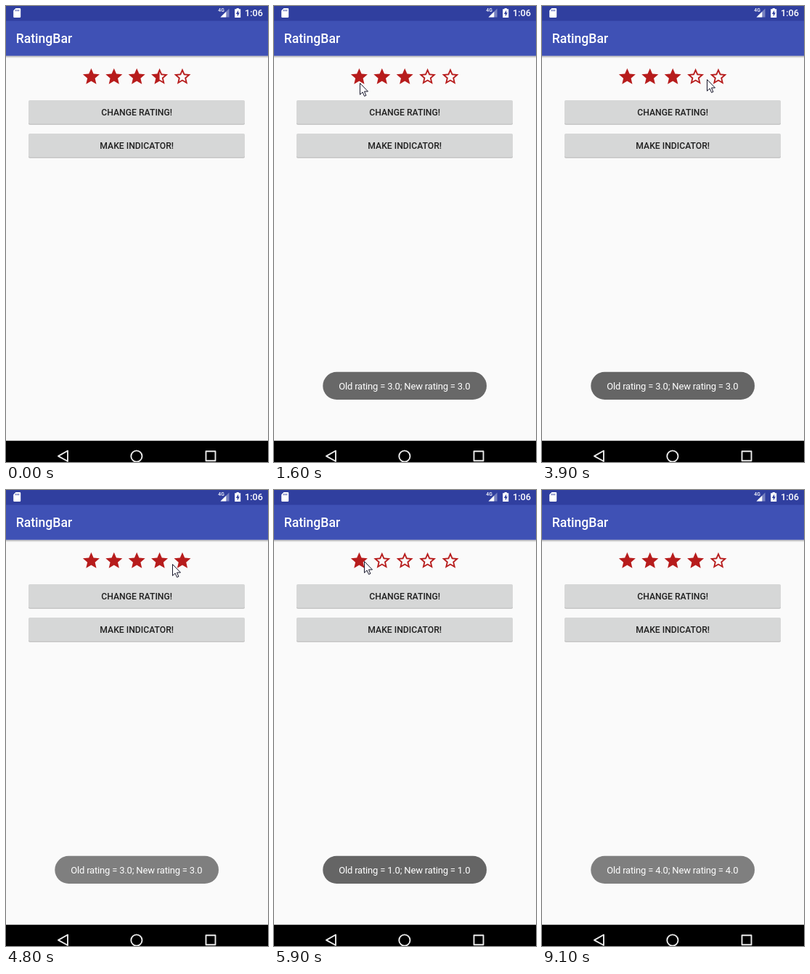
These frames come from a looping animation (361 px wide and 629 px high, 9.2 s). An HTML page:

```html
<!DOCTYPE html>
<html lang="en">
<head>
<meta charset="utf-8">
<title>Rating bar</title>
<style>
  html, body { margin: 0; width: 100%; height: 100%; overflow: hidden; background: #fafafa; }
  svg { display: block; width: 100%; height: 100%; }
  text { font-family: Roboto, sans-serif; }
  .medium { font-weight: 500; }
  .button rect { fill: #d6d7d7; filter: drop-shadow(0 1px .7px rgba(0, 0, 0, .27)); }
  .button text { fill: #202020; font-size: 12.2px; font-weight: 500; text-anchor: middle; }
  .nav { fill: none; stroke: #ececec; stroke-width: 1.9; stroke-linejoin: round; }
  #toast text { fill: #fff; font-size: 13px; letter-spacing: -.18px; }
</style>
</head>
<body>
<svg viewBox="0 0 361 629">
  <defs>
    <linearGradient id="shade" x2="0" y2="1">
      <stop stop-color="#000" stop-opacity=".32"/>
      <stop offset="1" stop-color="#000" stop-opacity="0"/>
    </linearGradient>
  </defs>
  <rect width="361" height="629" fill="#fafafa"/>

  <rect y="68.5" width="361" height="3.5" fill="url(#shade)"/>
  <rect y="20" width="361" height="48.7" fill="#3f51b5"/>
  <rect width="361" height="20.5" fill="#303f9f"/>
  <text class="medium" x="13.7" y="51" font-size="17.6" fill="#fff">RatingBar</text>

  <g fill="#fff">
    <path d="M13.5 3H19a1.2 1.2 0 0 1 1.2 1.2V14.8A1.2 1.2 0 0 1 19 16H11.4a1.2 1.2 0 0 1-1.2-1.2V6.3z"/>
    <path d="M13.6 5v2.3M15.6 5v2.3M17.6 5v2.3" stroke="#303f9f" stroke-width=".9"/>
    <text class="medium" x="292.3" y="8.3" font-size="6.8">4G</text>
    <path d="M307.5 3.5V15.5H295.5z" opacity=".35"/>
    <path d="M303.3 7.7V15.5H295.5z"/>
    <path d="M317.6 3h3.2v1.3h2.4V16h-8V4.3h2.4z"/>
    <path d="M320.1 5.8l-3.2 5.1h1.9v3.6l3.1-5.2h-1.8z" fill="#303f9f"/>
    <text class="medium" x="329" y="14.3" font-size="12.7">1:06</text>
  </g>

  <g id="stars" fill="#b71c1c" fill-rule="evenodd"></g>

  <g class="button">
    <rect x="31" y="130" width="298" height="32.8" rx="1.8"/>
    <text x="180.2" y="151">CHANGE RATING!</text>
  </g>
  <g class="button">
    <rect x="31" y="176" width="298" height="32.8" rx="1.8"/>
    <text x="180.2" y="197">MAKE INDICATOR!</text>
  </g>

  <g id="toast">
    <rect x="67.3" y="504.8" width="225.7" height="38.2" rx="19.1" fill="#656565"/>
    <text x="89.2" y="529"></text>
  </g>

  <rect y="599.7" width="361" height="30"/>
  <g class="nav">
    <path d="M72 620.8L85 613.5V628z"/>
    <circle cx="179.9" cy="621" r="7.6"/>
    <rect x="275.5" y="614.3" width="13" height="13"/>
  </g>

  <path id="cursor" d="M.5 .5V16.2L4.1 12.8L6.6 18.4L8.9 17.4L6.5 11.9H11.5z" fill="#fff" stroke="#15152a"/>
</svg>
<script>
  const LOOP = 9200, STEP = 100;
  const STAR_LEFT = 101.6, STAR_WIDTH = 31.4, FIRST_RATING = 3.5;
  const FADE_IN = 550, FADE_OUT = 380;
  const $ = (query) => document.querySelector(query);

  // Material star: body, full hole and right-hand half of the hole
  const BODY = 'M12 17.27L18.18 21l-1.64-7.03L22 9.24l-7.19-.61L12 2 9.19 8.63 2 9.24l5.46 4.73L5.82 21z';
  const HOLE = 'M12 15.4l-3.76 2.27 1-4.28-3.32-2.88 4.38-.38L12 6.1l1.71 4.04 4.38.38-3.32 2.88 1 4.28z';
  const HALF = 'M12 15.4V6.1l1.71 4.04 4.38.38-3.32 2.88 1 4.28z';

  // Places the pointer visits, entering and leaving off stage
  const stops = [
    { arrive: 0, leave: 0, x: 370, y: 58 },
    { arrive: 900, leave: 1000, x: 228, y: 106 },
    { arrive: 1300, leave: 1300, x: 161, y: 111 },
    { arrive: 1700, leave: 1800, x: 104, y: 104 },
    { arrive: 2500, leave: 2700, x: 185, y: 98 },
    { arrive: 3000, leave: 3200, x: 209, y: 117 },
    { arrive: 3700, leave: 3800, x: 223, y: 101 },
    { arrive: 4300, leave: 4500, x: 243, y: 101 },
    { arrive: 4800, leave: 4800, x: 229, y: 102 },
    { arrive: 5200, leave: 5800, x: 113, y: 104 },
    { arrive: 5900, leave: 5900, x: 124, y: 98 },
    { arrive: 6600, leave: 7800, x: 211, y: 105 },
    { arrive: 7900, leave: 7900, x: 214, y: 101 },
    { arrive: 8600, leave: LOOP, x: 362, y: 74 }
  ];
  // The button goes down and up; a drag lasts longer than a tap
  const presses = [
    { down: 1200, up: 1200 },
    { down: 1700, up: 1700 },
    { down: 2400, up: 2400 },
    { down: 4700, up: 5200 },
    { down: 6500, up: 6500 }
  ];
  const toasts = [{ show: 1100, hide: 4640 }, { show: 4950, hide: 8940 }];

  const clamp = (v) => Math.min(1, Math.max(0, v));
  const smooth = (k) => k * k * (3 - 2 * k);

  function pointerAt(t) {
    const i = stops.findLastIndex((stop) => stop.arrive <= t);
    const from = stops[i], to = stops[i + 1] || from;
    const k = clamp((t - from.leave) / (to.arrive - from.leave || 1));
    return { x: from.x + (to.x - from.x) * k, y: from.y + (to.y - from.y) * k };
  }

  // Star under the pointer during the latest press; `edge` is when a press starts to count
  function ratingAt(t, edge) {
    const press = presses.findLast((p) => p[edge] <= t);
    if (!press) return FIRST_RATING;
    const { x } = pointerAt(Math.min(t, press.up));
    return Math.ceil((x - STAR_LEFT) / STAR_WIDTH);
  }

  function toastOpacity(t) {
    return Math.max(...toasts.map(({ show, hide }) =>
      smooth(clamp((t - show) / FADE_IN)) * (1 - clamp((t - hide) / FADE_OUT) ** 2)));
  }

  for (let i = 0; i < 5; i++) {
    const star = document.createElementNS('http://www.w3.org/2000/svg', 'path');
    star.setAttribute('transform', `translate(${STAR_LEFT + 2 + i * STAR_WIDTH} 83.7) scale(1.15)`);
    $('#stars').append(star);
  }
  const stars = [...$('#stars').children];
  const toast = $('#toast'), label = $('#toast text'), cursor = $('#cursor');

  function draw(t) {
    const rating = ratingAt(t, 'down');
    stars.forEach((star, i) => {
      const fill = rating - i;
      star.setAttribute('d', BODY + (fill >= 1 ? '' : fill > 0 ? HALF : HOLE));
    });

    const before = ratingAt(t - STEP, 'up'), after = ratingAt(t, 'up');
    label.textContent = `Old rating = ${before.toFixed(1)}; New rating = ${after.toFixed(1)}`;
    toast.setAttribute('opacity', toastOpacity(t));

    const { x, y } = pointerAt(t);
    cursor.setAttribute('transform', `translate(${Math.round(x)} ${Math.round(y)})`);
  }

  const start = performance.now();
  function tick() {
    const t = (performance.now() - start) % LOOP;
    draw(Math.floor(t / STEP) * STEP);
    requestAnimationFrame(tick);
  }
  tick();
</script>
</body>
</html>
```
